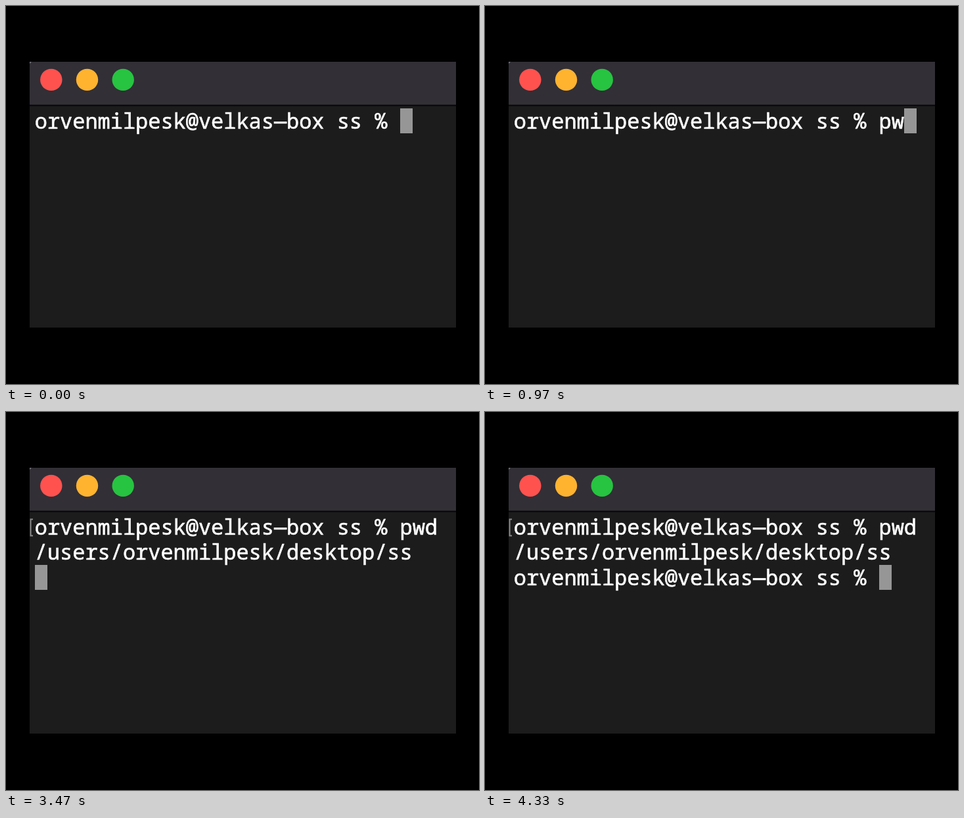
An HTML page for the animation above (4570 ms loop, 720 px wide and 576 px high).

```html
<!DOCTYPE html>
<html lang="en">
<head>
<meta charset="utf-8">
<title>Terminal</title>
<style>
  html, body { margin: 0; width: 100%; height: 100%; overflow: hidden; background: #000; }
  svg { display: block; width: 100vw; height: 100vh; }
  text {
    font: 500 31.95px "Noto Sans Mono", "DejaVu Sans Mono", monospace;
    fill: #fff;
    stroke: #fff;
    stroke-width: .6px;
    white-space: pre;
    font-variant-ligatures: none;
  }
</style>
</head>
<body>
<svg viewBox="0 0 720 576">
  <rect width="720" height="576" fill="#000"/>
  <rect x="36" y="85" width="649" height="405" fill="#1c1c1c"/>
  <rect x="36" y="85" width="649" height="66" fill="#322f36"/>
  <path d="M36 85h3l-3 3z" fill="#77757a"/>
  <rect x="36" y="150.5" width="649" height="2" fill="#060606"/>
  <circle cx="68.8" cy="112.4" r="16.7" fill="#ff524f"/>
  <circle cx="123.5" cy="112.4" r="16.7" fill="#ffb32f"/>
  <circle cx="178.2" cy="112.4" r="16.7" fill="#26c440"/>
  <path id="mark" d="M41 163.5H37.5V188.5H41" fill="none" stroke="#8a8a8a" stroke-width="2"/>
  <g id="lines"></g>
  <rect id="cursor" width="19" height="38" fill="#969696"/>
</svg>
<script>
const LOOP = 4570;
const LEFT = 43.8, TOP = 156, CELL = 19.17, ROW = 38.3, BASELINE = 31;
const USER = "orvenmilpesk";
const PROMPT = USER + "@velkas—box ss % ";
const COMMAND = "pwd";
const KEY_TIMES = [30, 970, 1070];
const OUTPUT_AT = 3470, PROMPT_AT = 3500;

const $ = id => document.getElementById(id);
const rows = [0, 1, 2].map(i => {
  const row = document.createElementNS("http://www.w3.org/2000/svg", "text");
  row.setAttribute("x", LEFT);
  row.setAttribute("y", TOP + BASELINE + i * ROW);
  return $("lines").appendChild(row);
});

function screenAt(t) {
  const typed = KEY_TIMES.filter(k => t >= k).length;
  const lines = [PROMPT + COMMAND.slice(0, typed)];
  if (t >= OUTPUT_AT) {
    lines.push("/users/" + USER + "/desktop/ss", t >= PROMPT_AT ? PROMPT : "");
  }
  return lines;
}

function draw(t) {
  const lines = screenAt(t);
  rows.forEach((row, i) => {
    const line = lines[i] || "";
    if (row.textContent !== line) row.textContent = line;
  });
  const last = lines.length - 1;
  $("cursor").setAttribute("x", Math.round(LEFT + lines[last].length * CELL));
  $("cursor").setAttribute("y", Math.round(TOP + last * ROW));
  $("mark").setAttribute("visibility", t >= OUTPUT_AT ? "visible" : "hidden");
}

const start = performance.now();
function tick() {
  draw((performance.now() - start) % LOOP);
  requestAnimationFrame(tick);
}
draw(0);
requestAnimationFrame(tick);
</script>
</body>
</html>
```
